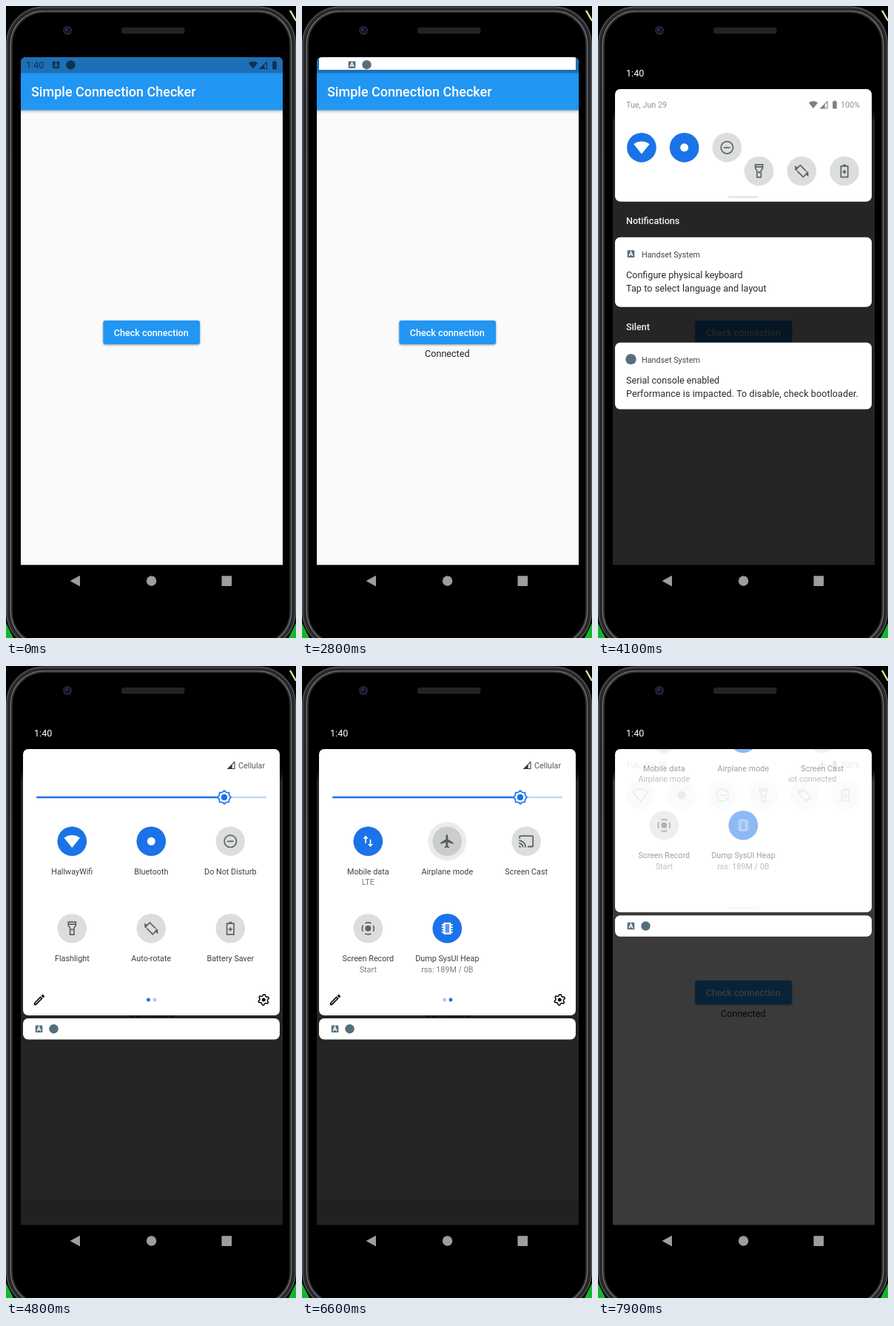
An HTML page that plays this animation: 392 px wide and 852 px high, repeating every 8 s.

```html
<!DOCTYPE html>
<html lang="en">
<head>
<meta charset="utf-8">
<title>Simple Connection Checker</title>
<style>
html, body { margin: 0; width: 100%; height: 100%; overflow: hidden; background: #000; }
svg { display: block; }
text { font-family: Roboto, sans-serif; font-size: 12.6px; white-space: pre; }
.s { font-size: 10.8px; }
.m { font-weight: 500; }
.c { text-anchor: middle; }
.e { text-anchor: end; }
.line { fill: none; stroke: currentColor; stroke-width: 1.7; }
</style>
</head>
<body>
<svg id="stage" width="392" height="852" viewBox="0 0 392 852"></svg>
<script>
const LOOP = 8000, STEP = 100;
const BLUE = '#1a73e8', GREY = '#5f6368', SLATE = '#54707c';
const clamp = (v, a = 0, b = 1) => Math.min(b, Math.max(a, v));
const ramp = (t, a, b) => clamp((t - a) / (b - a));
const mix = (a, b, k) => a + (b - a) * k;
const smooth = u => u * u * (3 - 2 * u);

const text = (x, y, s, cls = '', fill = '#3c4043', extra = '') =>
  `<text x="${x}" y="${y}" class="${cls}" fill="${fill}" ${extra}>${s}</text>`;
const rect = (x, y, w, h, fill, extra = '') =>
  `<rect x="${x}" y="${y}" width="${w}" height="${h}" fill="${fill}" ${extra}/>`;
const circle = (x, y, r, fill, extra = '') =>
  `<circle cx="${x}" cy="${y}" r="${r}" fill="${fill}" ${extra}/>`;
const place = (x, y, k, body) => `<g transform="translate(${x} ${y}) scale(${k})">${body}</g>`;
// Glyph drawn on a 24 unit grid, centred
const glyph = (d, k = .9) => `<path transform="scale(${k}) translate(-12 -12)" fill="currentColor" d="${d}"/>`;
const line = (d, extra = '') => `<path class="line" d="${d}" ${extra}/>`;

// Closed outline from a radius rule
function ring(n, radius) {
  const pts = [];
  for (let i = 0; i < n; i++) {
    const a = i / n * 2 * Math.PI, r = radius(i);
    pts.push((r * Math.sin(a)).toFixed(2) + ' ' + (-r * Math.cos(a)).toFixed(2));
  }
  return 'M' + pts.join('L') + 'Z';
}

const WIFI = 'M12 21.5L23.64 7c-.45-.34-4.93-4-11.64-4S.81 6.66.36 7z';
const PLANE = 'M21 16v-2l-8-5V3.5c0-.83-.67-1.5-1.5-1.5S10 2.67 10 3.5V9l-8 5v2l8-2.5V19l-2 1.5V22l3.5-1 3.5 1v-1.5L13 19v-5.5l8 2.5z';
const BATTERY = 'M15.67 4H14V2h-4v2H8.33C7.6 4 7 4.6 7 5.33v15.33C7 21.4 7.6 22 8.33 22h7.33c.74 0 1.34-.6 1.34-1.33V5.33C17 4.6 16.4 4 15.67 4z';
const PENCIL = 'M14.06 9.02l.92.92L5.92 19H5v-.92l9.06-9.06M17.66 3c-.25 0-.51.1-.7.29l-1.83 1.83 3.75 3.75 1.83-1.83c.39-.39.39-1.02 0-1.41l-2.34-2.34c-.2-.2-.45-.29-.71-.29zm-3.6 3.19L3 17.25V21h3.75L17.81 9.94z';
const CAST = 'M21 3H3c-1.1 0-2 .9-2 2v3h2V5h18v14h-7v2h7c1.1 0 2-.9 2-2V5c0-1.1-.9-2-2-2zM1 18v3h3c0-1.66-1.34-3-3-3zm0-4v2c2.76 0 5 2.24 5 5h2c0-3.87-3.13-7-7-7zm0-4v2c4.97 0 9 4.03 9 9h2c0-6.08-4.93-11-11-11z';
const signal = '<path fill="currentColor" fill-rule="evenodd" d="M-5.5 5.5L5.5-5.5V5.5ZM1.8 4.4H4.4V-2.8L1.8-.2Z"/>';

const icons = {
  wifi: `<g id="fan" stroke="currentColor">${glyph(WIFI, .92)}</g>`,
  dot: circle(0, 0, 5.5, 'currentColor'),
  dnd: line('M-4.2 0H4.2') + circle(0, 0, 8.2, 'none', 'class="line"'),
  torch: line('M-5-8.6H5V-4L2.7-.5V8.4H-2.7V-.5L-5-4ZM-5-5.6H5') + circle(0, 1.6, 1.3, 'currentColor'),
  rotate: `<g transform="rotate(45)">${line('M-5 4.2H-7V-4.2H4M5-4.2H7V4.2H-4')}</g>` +
    '<path fill="currentColor" d="M-9-1.5V-7.5L-4.5-4ZM9 1.5V7.5L4.5 4Z"/>',
  saver: line('M-4.7-6.6H4.7V8H-4.7ZM-2.6 1H2.6M0-1.6V3.6') + rect(-2, -9, 4, 2, 'currentColor'),
  data: line('M-3.2 2.5V-5M3.2-2.5V5') + '<path fill="currentColor" d="M-6.8-3.6L-3.2-7.8L.4-3.6ZM-.4 3.6L3.2 7.8L6.8 3.6Z"/>',
  plane: glyph(PLANE),
  cast: glyph(CAST),
  record: circle(0, 0, 4, 'currentColor') +
    circle(0, 0, 8, 'none', 'class="line" stroke-dasharray="8.57 4" stroke-dashoffset="4.28"'),
  chip: line('M-7.5-5H7.5M-7.5-1.7H7.5M-7.5 1.7H7.5M-7.5 5H7.5') + rect(-5, -8, 10, 16, 'currentColor') +
    rect(-2.8, -5.8, 5.6, 11.6, '#5a98ee')
};

const tile = (id, icon, label, x = 0, y = 0, sub = '') => `
  <g id="${id}" transform="translate(${x} ${y})">
    ${circle(0, 0, 19.8, '#dcdddd')}${circle(0, 0, 19.8, BLUE, 'class="on"')}
    <g class="icon">${icons[icon]}</g>
    <g class="label">${text(0, 44.3, label, 's c')}${sub}</g>
  </g>`;
const sub = (s, id = '') => text(0, 58.8, s, 's c', '#7a7d80', id && `id="${id}"`);

const badge = (x, y, fill, cut) =>
  `<g transform="translate(${x} ${y})">${rect(-4.8, -4.8, 9.6, 9.6, fill, 'rx="1"')}
   <path d="M-2.4 3L0-3L2.4 3M-1.6 1.2H1.6" fill="none" stroke="${cut}" stroke-width="1.3"/></g>`;
const card = (id, y, icon, a, b) => `
  ${rect(23, y, 347, 94, '#fff', `id="${id}" rx="7"`)}${icon}
  ${text(59, y + 27, 'Handset System', 's', '#444')}
  ${text(38, y + 55.6, a, '', '#2a2a2a')}
  ${text(38, y + 73, b, '', '#2a2a2a', 'letter-spacing=".07"')}`;
const screenRect = 'M20 753.5V77Q20 69 28 69H366Q374 69 374 77V753.5Z';
const rim = (i, stroke, w, fill = 'none') =>
  rect(i, i + .5, 392 - 2 * i, 867 - 2 * i, fill, `rx="${51 - i}" stroke="${stroke}" stroke-width="${w}"`);

const page1 = [
  ['wifi', 'wifi', 'HallwayWifi'], ['bt', 'dot', 'Bluetooth'], ['dnd', 'dnd', 'Do Not Disturb'],
  ['torch', 'torch', 'Flashlight'], ['rotate', 'rotate', 'Auto-rotate'], ['saver', 'saver', 'Battery Saver']
];

const stage = document.getElementById('stage');
stage.innerHTML = `
<defs>
  <clipPath id="screen"><path d="${screenRect}"/></clipPath>
  <clipPath id="btnClip"><rect x="131.4" y="424" width="130.6" height="32" rx="3"/></clipPath>
  <clipPath id="stackClip"><rect id="stackBox" x="20" width="354"/></clipPath>
  <clipPath id="panelClip"><rect id="panelBox" x="23" y="112" width="347" rx="7"/></clipPath>
  <clipPath id="pageClip"><rect id="pageBox" y="100" height="400"/></clipPath>
  <clipPath id="castClip"><rect x="-45" y="46" width="90" height="18"/></clipPath>
  <linearGradient id="fade" x2="0" y2="1"><stop stop-color="#000"/><stop offset="1" stop-color="#000" stop-opacity="0"/></linearGradient>
</defs>
${rect(0, 0, 392, 852, '#000')}
<path d="M0 832V852H10Z M392 832V852H382Z" fill="#17b52f"/>
<path d="M384 6L392 20" stroke="#cfe59a" stroke-width="2.5"/>
${rim(1, '#4a4d4f', 2, '#151617')}${rim(3.5, '#2a2c2e', 2)}${rim(6.3, '#696c6f', 1.6)}${rim(8, '#303235', 1.6)}${rim(9.8, '#000', 2, '#000')}
${circle(83, 33, 6.2, '#20212a')}${circle(83, 33, 3.4, '#10122b')}${circle(82, 32, 1.3, '#3d4270')}
${rect(156, 29, 85.5, 8.4, '#232323', 'rx="3"')}
<g fill="#9d9d9d"><path d="M86.5 775L100 767.8V782.4Z"/>${circle(196.6, 775, 6.7, '#9d9d9d')}${rect(291.5, 768.3, 13.6, 13.6, '#9d9d9d', 'rx="1"')}</g>
<g clip-path="url(#screen)">
  ${rect(20, 69, 354, 685, '#fafafa')}
  ${rect(20, 140, 354, 5, 'url(#fade)', 'opacity=".25"')}
  ${rect(20, 69, 354, 71.4, '#2196f3')}${rect(20, 69, 354, 21.5, '#1c70b6')}
  <g id="status" color="#0f3150">
    ${text(27, 84, '1:40', '', '#0f3150')}
    ${badge(67.6, 79.5, '#0f3150', '#1c70b6')}${circle(87.5, 79.5, 6.2, '#0f3150')}
    ${place(334, 79.5, .58, glyph(WIFI))}${place(347.5, 79.5, 1, signal)}${place(363, 79.5, .64, glyph(BATTERY))}
  </g>
  ${text(34, 122, 'Simple Connection Checker', 'm', '#fff', 'style="font-size:18px"')}
  ${rect(131.4, 424, 130.6, 32, '#2196f3', 'rx="3" id="btn"')}
  <g clip-path="url(#btnClip)">${circle(238, 446, 10, '#fff', 'id="ripple"')}</g>
  ${text(196.3, 444.5, 'Check connection', 'm c', '#fff')}
  ${text(196.3, 473.2, 'Connected', 'c', '#222', 'id="result"')}
</g>
${rect(19, 68, 356, 686, '#000', 'id="scrim"')}
${rect(20, 720, 354, 34, '#000', 'id="foot"')}
<g id="head">${rect(19, 68, 356, 72, '#000')}${rect(19, 140, 356, 16, 'url(#fade)')}</g>
<g clip-path="url(#screen)">
  ${text(38, 95, '1:40', '', '#fff', 'id="clock"')}
  <g id="stackWrap" clip-path="url(#stackClip)"><g id="stack">
    ${text(38, 251.6, 'Notifications', 'm', '#f1f1f1')}
    ${card('card1', 269, badge(44.5, 291.5, SLATE, '#fff'), 'Configure physical keyboard', 'Tap to select language and layout')}
    ${text(38, 394, 'Silent', 'm', '#f1f1f1')}
    ${card('card2', 411, circle(44.5, 433.5, 7.2, SLATE), 'Serial console enabled', 'Performance is impacted. To disable, check bootloader.')}
  </g></g>
  <g id="manage">${text(38, 537, 'Manage', 'm', '#f1f1f1')}${text(355, 537, 'Clear all', 'm e', '#f1f1f1')}</g>
  <g id="shelf">${rect(23, 0, 347, 28.5, '#fff', 'id="shelfBox"')}
    <g id="shelfIcons">${badge(44.5, 14.2, SLATE, '#fff')}${circle(64.5, 14.2, 6.2, SLATE)}</g></g>
  <g id="panel">
    ${rect(23, 112, 347, 109, '#fff', 'rx="7" id="panelBg"')}
    <g clip-path="url(#panelClip)">
      <g id="brief" color="#3c4043">
        ${text(38, 137, 'Tue, Jun 29', 's', '#55585b')}${text(354, 137, '100%', 's e', '#55585b')}
        <g id="online">${place(291, 133, .58, glyph(WIFI))}${place(305, 133, 1, signal)}</g>
        <g id="flight">${place(303, 133, .6, glyph(PLANE))}</g>
        ${place(320, 133, .62, glyph(BATTERY))}
      </g>
      <g id="full">
        <g id="carrier" color="#3c4043">${place(304, 133.5, 1, signal)}${text(314, 138, 'Cellular', 's', '#55585b')}</g>
        ${rect(41, 175.8, 250, 2.5, BLUE, 'rx="1"')}${rect(300, 175.8, 52, 2.5, '#c3d8f6', 'rx="1"')}
        <g transform="translate(295 177)" stroke="${BLUE}" stroke-width="1.8" stroke-linejoin="round">
          <path d="${ring(16, i => i % 2 ? 7.2 : 9)}" fill="#fff"/>${circle(0, 0, 3.4, BLUE)}</g>
        ${place(45, 450, 1, glyph(PENCIL, .8))}
        <g transform="translate(348.3 450)" fill="none" stroke="#111" stroke-width="1.6" stroke-linejoin="round">
          <path d="${ring(24, i => i % 4 < 2 ? 7.2 : 5.3)}"/>${circle(0, 0, 1.7, '#111')}</g>
        ${[192.5, 201].map((x, i) => circle(x, 450, 2.4, '#a9c9f5') + circle(x, 450, 2.4, BLUE, `id="dot${i}"`)).join('')}
      </g>
      <g clip-path="url(#pageClip)">
        <g id="page1">${page1.map(p => tile(...p)).join('')}</g>
        <g id="page2">
          ${tile('data', 'data', 'Mobile data', 89.3, 236.3, sub('LTE', 'dataSub'))}
          ${tile('plane', 'plane', 'Airplane mode', 196.3, 236.3)}
          ${circle(196.3, 236.3, 26, '#000', 'id="touch"')}
          ${tile('cast', 'cast', 'Screen Cast', 303.2, 236.3,
            `<g clip-path="url(#castClip)">${text(-45, 58.8, 'Wi-Fi not connected', 's', '#7a7d80', 'id="castSub"')}</g>`)}
          ${tile('record', 'record', 'Screen Record', 89.3, 353.8, sub('Start'))}
          ${tile('heap', 'chip', 'Dump SysUI Heap', 196.3, 353.8, sub('rss: 189M / 0B'))}
        </g>
      </g>
      ${rect(176, 0, 41, 2.6, '#dcdddf', 'rx="1.3" id="handle"')}
    </g>
  </g>
</g>`;

const el = {};
stage.querySelectorAll('[id]').forEach(n => el[n.id] = n);
const set = (id, attrs) => { for (const k in attrs) el[id].setAttribute(k, attrs[k]); };
const alpha = (id, v) => set(id, { opacity: v, visibility: v > 0 ? 'visible' : 'hidden' });
const move = (id, x, y) => set(id, { transform: `translate(${x} ${y})` });
function setOn(id, k, iconAlpha = 1) {
  const icon = el[id].querySelector('.icon');
  el[id].querySelector('.on').setAttribute('opacity', k);
  icon.setAttribute('color', k > .5 ? '#fff' : GREY);
  icon.setAttribute('opacity', iconAlpha);
}

function drawApp(t) {
  const press = ramp(t, 400, 800);
  set('ripple', { r: 12 + 118 * press });
  alpha('ripple', t < 500 ? 0 : .24 * (1 - ramp(t, 700, 1100)));
  const lift = t >= 500 && t < 900 ? 2.6 : 1.4;
  el.btn.style.filter = `drop-shadow(0 1px ${lift}px rgba(0,0,0,.4))`;
  alpha('result', t >= 800 ? 1 : 0);
  alpha('status', t < 2800 ? 1 : 0);
}

function drawShade(t) {
  const pull = ramp(t, 2800, 3200), reveal = ramp(t, 3200, 3600);
  const closing = t > 7100, flight = ramp(t, 6600, 7000), off = flight > 0;
  const p = closing ? 1 - .556 * ramp(t, 7100, 7900) ** 1.4
                    : 1 - (1 - ramp(t, 4000, 4800)) ** 1.4;
  const slide = -164 * (1 - pull);
  const height = 109 + 250 * p, bottom = 112 + height;
  const open = t >= 2800;

  alpha('scrim', pull * .45 + reveal * .4 - (closing ? (1 - p) * .144 : 0));
  alpha('foot', closing ? 0 : .1 * ramp(p, .6, 1));
  alpha('head', pull);
  alpha('clock', pull);

  // Notification stack, cut off by the shelf
  const shift = bottom - 221, end = 505 + shift;
  const limit = closing ? bottom + 32.8 : p > 0 ? Math.min(end, 552 - 48.5 * p) : mix(257.5, 505, reveal);
  alpha('stackWrap', reveal > 0 && p < 1 && !closing ? 1 : 0);
  move('stack', 0, shift);
  set('stackBox', { y: bottom, height: Math.max(0, limit - bottom) });
  set('card1', { height: clamp(limit - 269 - shift, 0, 94) });
  set('card2', { height: clamp(limit - 411 - shift, 0, 94) });
  alpha('manage', p > 0 ? 0 : ramp(t, 3600, 3900));
  alpha('shelf', open ? clamp((end - limit - 8) / 40) : 0);
  move('shelf', 0, pull < 1 ? 229 + slide : limit - 28.5);
  set('shelfBox', { height: 21 + 7.5 * pull, rx: 7 * pull });
  move('shelfIcons', 23 * (1 - pull), 0);

  // Quick settings panel
  alpha('panel', open ? 1 : 0);
  move('panel', 0, slide);
  set('panelBg', { height });
  set('panelBox', { height });
  const brief = Math.max(0, 1 - 2 * p);
  alpha('brief', brief);
  alpha('online', !off && brief ? 1 : 0);
  alpha('flight', off && brief ? 1 : 0);
  alpha('full', ramp(p, .5, 1));
  move('full', 0, bottom - 471);
  alpha('carrier', p > .5 ? 1 - flight : 0);
  set('handle', { y: bottom - 7.3 });
  alpha('handle', Math.max(0, 1 - 1.6 * p));

  // Tiles travel from one row to the grid, then the pages swipe
  const swipe = smooth(ramp(t, 4900, 5800)), dots = smooth(ramp(t, 4900, 5900));
  const inner = t >= 4900 && !closing;
  set('pageBox', { x: inner ? 39 : 23, width: inner ? 315 : 347 });
  const kx = closing ? 0 : p ** 1.75, ky = closing ? 0 : p ** .74;
  page1.forEach(([id], i) => {
    const row = i > 2 ? 1 : 0;
    move(id, mix(57.5 + 55.4 * i, 89.3 + 107 * (i % 3), kx), mix(174, 236.3 + 117.5 * row, ky));
    setOn(id, i < 2 && !off ? 1 : 0);
    el[id].querySelector('.label').setAttribute('opacity', closing ? 0 : ramp(p, .6, 1));
  });
  set('fan', { 'fill-opacity': off ? 0 : 1, 'stroke-width': off ? 1.7 : 0 });
  move('page1', closing ? 0 : -347 * swipe, 0);
  alpha('page1', closing ? brief : swipe < 1 ? 1 : 0);
  move('page2', 347 * (1 - swipe), bottom - 471);
  alpha('page2', swipe > 0 ? p ** .85 : 0);
  alpha('dot0', p > .5 ? 1 - dots : 0);
  alpha('dot1', p > .5 ? dots : 0);

  setOn('data', 1 - flight);
  setOn('plane', flight, p);
  setOn('cast', 0);
  setOn('record', 0);
  setOn('heap', 1, p);
  el.dataSub.textContent = off ? 'Airplane mode' : 'LTE';
  alpha('castSub', off ? 1 : 0);
  set('castSub', { x: -45 - 31 * ramp(t, 6700, 7900) });
  set('touch', { r: mix(10, 26, ramp(t, 6200, 6600)) });
  alpha('touch', t < 6300 ? 0 : .08 * (1 - ramp(t, 6600, 7100)));
}

function draw(ms) {
  const t = Math.floor((ms % LOOP) / STEP) * STEP;
  drawApp(t);
  drawShade(t);
}

const start = performance.now();
function tick() {
  draw(performance.now() - start);
  requestAnimationFrame(tick);
}
tick();
</script>
</body>
</html>
```
